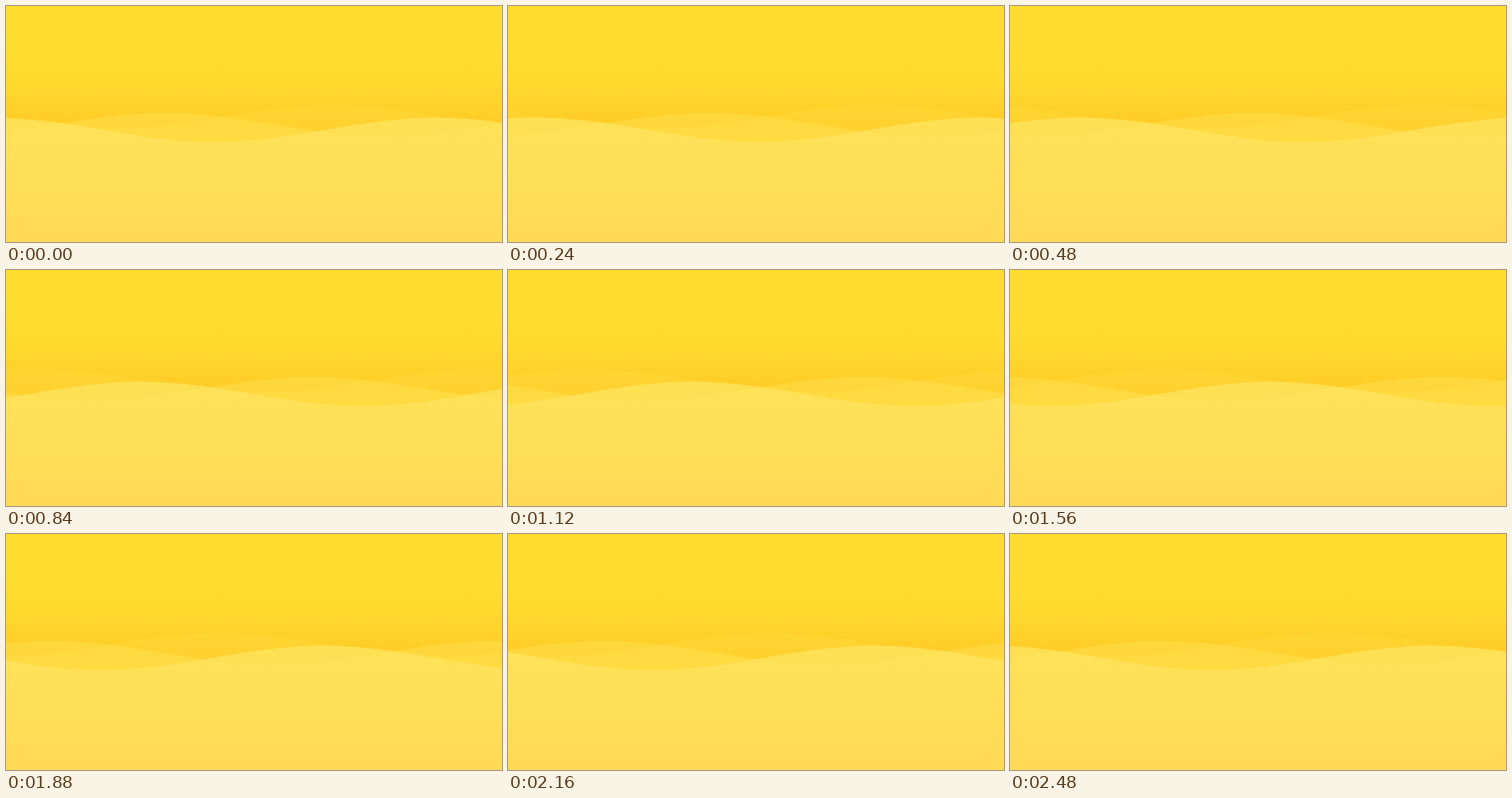
Write an HTML page with a canvas that moves like this. It is 640x304 px and loops after 2520 ms.

```html
<!DOCTYPE html>
<html lang="en">
<head>
<meta charset="utf-8">
<title>Yellow waves</title>
<style>
  html, body { margin: 0; width: 100%; height: 100%; overflow: hidden; }
  canvas { display: block; }
</style>
</head>
<body>
<canvas id="stage" width="640" height="304"></canvas>
<script>
const W = 640, H = 304, LOOP = 2520, WAVELENGTH = 572;
const ctx = document.getElementById('stage').getContext('2d');

function verticalGradient(stops) {
  const gradient = ctx.createLinearGradient(0, 0, 0, H);
  for (const [y, color] of stops) gradient.addColorStop(y / H, color);
  return gradient;
}

const sky = verticalGradient([
  [0, 'rgb(255,221,48)'], [92, 'rgb(255,219,47)'], [148, 'rgb(255,205,40)']
]);

// Back to front; crest is the x of a peak at time zero.
const waves = [
  { crest: 420, mid: 143, amp: 15, fill: 'rgba(255,230,80,.2)' },
  { crest: 205, mid: 153, amp: 15, fill: 'rgba(255,230,90,.4)' },
  { crest: 555, mid: 159.5, amp: 15.5, fill: verticalGradient([
    [150, 'rgba(255,230,98,.72)'], [H, 'rgba(255,218,95,.72)']
  ]) }
];

function drawWave({ crest, mid, amp, fill }, shift) {
  ctx.beginPath();
  ctx.moveTo(0, H);
  for (let x = 0; x <= W; x += 4) {
    ctx.lineTo(x, mid - amp * Math.cos((x - crest - shift) / WAVELENGTH * 2 * Math.PI));
  }
  ctx.lineTo(W, H);
  ctx.fillStyle = fill;
  ctx.fill();
}

function render() {
  const shift = performance.now() % LOOP / LOOP * WAVELENGTH;
  ctx.fillStyle = sky;
  ctx.fillRect(0, 0, W, H);
  for (const wave of waves) drawWave(wave, shift);
  requestAnimationFrame(render);
}
render();
</script>
</body>
</html>
```
